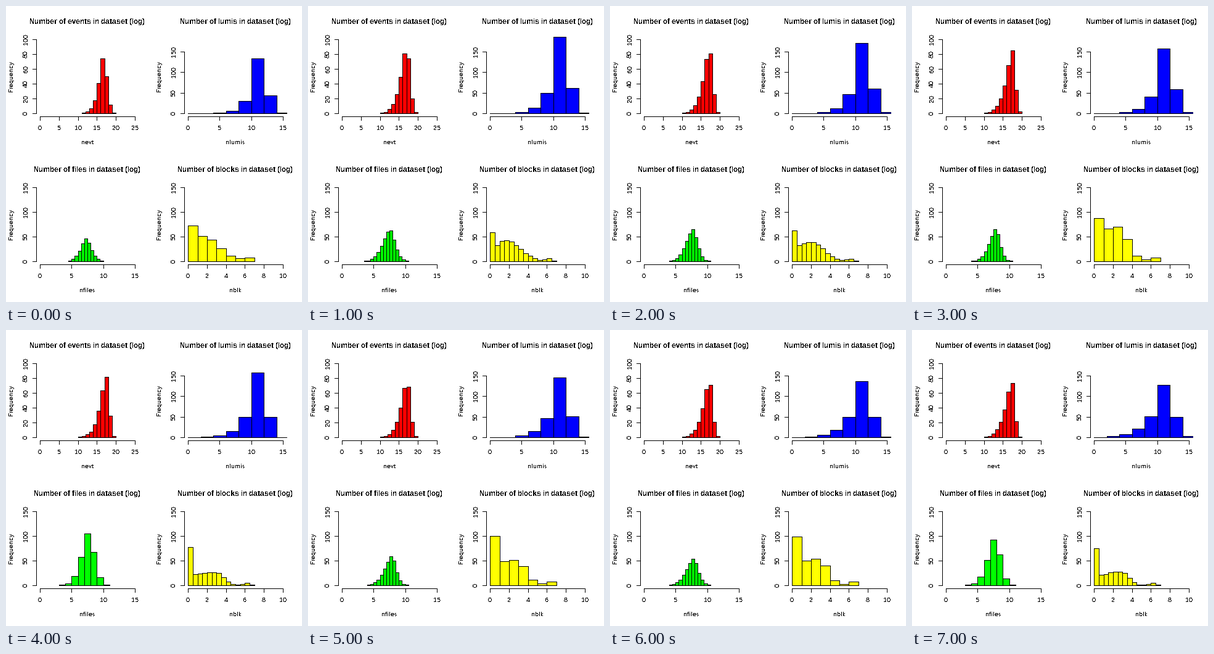
Animation of 480x480 px, one loop 8000 ms. Source, as a matplotlib script:

```python
import math

import matplotlib.pyplot as plt
import numpy as np
from matplotlib.animation import FuncAnimation
from matplotlib.patches import Rectangle

SIZE, DPI, SECONDS = 480, 96, 8
PX = 72 / DPI            # one pixel in points
LEFT, RIGHT, TOP, BOTTOM = 49, 214.9, 49, 179.1   # plot region inside a panel
KEY_TIMES = [0, 1, 3, 4, 5, 7]                    # seconds of the key points

plt.rcParams.update({
    "font.family": "Liberation Sans",
    "text.antialiased": False,
    "text.hinting": "native",
    "text.hinting_factor": 1,
})

fig = plt.figure(figsize=(SIZE / DPI, SIZE / DPI), dpi=DPI, facecolor="white")
ax = fig.add_axes([0, 0, 1, 1])
ax.set(xlim=(0, SIZE), ylim=(SIZE, 0))
ax.axis("off")


def line(x0, y0, x1, y1):
    ax.plot([x0, x1], [y0, y1], color="black", lw=PX, antialiased=False,
            solid_capstyle="projecting")


def label(x, y, text, size=10, **kw):
    ax.text(x, y, text, fontsize=size * PX, ha="center", va="baseline",
            rotation_mode="anchor", **kw)


class Sample:
    """A one-peaked distribution whose parameters drift through key points."""

    def __init__(self, mode, peak, left, right, powers, width=(1,) * 6,
                 spike=(0,) * 6, tail=0, from_zero=False):
        self.keys = [mode, peak, left, right, spike]
        self.powers, self.width = powers, width
        self.tail, self.from_zero = tail, from_zero

    def bins(self, t, xmax):
        """First break, bin width and counts at second t."""
        mode, peak, left, right, spike = (np.interp(t, KEY_TIMES, k)
                                          for k in self.keys)
        width = self.width[np.searchsorted(KEY_TIMES, t, "right") - 1]
        breaks = np.arange(0, xmax + 1, width)
        d = breaks + width / 2 - mode
        fall = np.where(d < 0, (np.abs(d) / left) ** self.powers[0],
                        (np.abs(d) / right) ** self.powers[1])
        bump = self.tail * np.exp(-((d + mode - 6.2) / 0.6) ** 2)
        counts = width * (peak * np.exp(-fall) + bump)
        counts[0] += spike
        counts = np.rint(counts)
        used = np.flatnonzero(counts)
        first = 0 if self.from_zero else used[0]
        return breaks[first], width, counts[first:used[-1] + 1]


class Panel:
    def __init__(self, ox, oy, noun, name, color, xmax, xstep, ymax, ystep, sample):
        self.ox, self.oy = ox, oy
        self.xmax, self.ymax = xmax, ymax
        self.color, self.sample = color, sample
        self.clip = Rectangle((ox + LEFT, oy + TOP), RIGHT - LEFT + 1,
                              BOTTOM - TOP + 1, transform=ax.transData)
        self.bars = []
        mid_x = ox + (LEFT + RIGHT) / 2
        mid_y = oy + (TOP + BOTTOM) / 2
        label(mid_x, oy + 29, f"Number of {noun} in dataset (log)", 12.4,
              weight="bold")
        label(mid_x, oy + 224, name)
        label(ox + 11, mid_y, "Frequency", rotation=90)
        self.draw_axes(range(0, xmax + 1, xstep), range(0, ymax + 1, ystep))

    # Whole pixels: the renderer itself moves thin lines to pixel centres.
    def x(self, v):
        span = RIGHT - LEFT
        return round(self.ox + LEFT + span * (0.04 + v / self.xmax) / 1.08)

    def y(self, v):
        span = BOTTOM - TOP
        return round(self.oy + BOTTOM - span * (0.04 + v / self.ymax) / 1.08)

    def draw_axes(self, xticks, yticks):
        base, side = math.floor(self.oy + BOTTOM), self.ox + LEFT
        line(self.x(xticks[0]), base, self.x(xticks[-1]), base)
        line(side, self.y(yticks[0]), side, self.y(yticks[-1]))
        for t in xticks:
            line(self.x(t), base, self.x(t), base + 6)
            label(self.x(t), self.oy + 201, str(t))
        for t in yticks:
            line(side - 6, self.y(t), side, self.y(t))
            label(self.ox + 35, self.y(t), str(t), rotation=90)

    def show(self, t):
        for bar in self.bars:
            bar.remove()
        self.bars = []
        start, width, counts = self.sample.bins(t, self.xmax)
        for k, n in enumerate(counts):
            x0 = self.x(start + k * width)
            x1 = self.x(start + (k + 1) * width)
            y0, y1 = self.y(0), self.y(n)
            bar = Rectangle((x0, y1), x1 - x0, y0 - y1, facecolor=self.color,
                            edgecolor="black", lw=PX, antialiased=False, zorder=3)
            ax.add_patch(bar)
            bar.set_clip_path(self.clip)
            self.bars.append(bar)


events = Sample(mode=[16.6, 16.9, 17.3, 17.3, 17.0, 17.2],
                peak=[76, 92, 87, 85, 79, 78],
                left=[1.6, 2.0, 2.1, 2.0, 2.0, 2.2],
                right=[1.4, 1.3, 1.2, 1.15, 1.3, 1.15],
                powers=(1.3, 2))
lumis = Sample(mode=[11] * 6,
               peak=[66.5, 92.5, 78.5, 79, 72.5, 63.5],
               left=[1.35, 1.53, 1.5, 1.75, 1.75, 2.2],
               right=[1.9, 1.9, 2.0, 1.85, 1.95, 2.05],
               powers=(1, 2), width=[2] * 6, from_zero=True)
files = Sample(mode=[7.3, 7.6, 7.9, 7.7, 7.9, 7.8],
               peak=[92, 128, 132, 108, 120, 97],
               left=[1.25, 1.65, 1.5, 1.6, 1.6, 1.7],
               right=[1.2, 1.15, 0.95, 1.25, 0.95, 1.15],
               powers=(1.7, 1.7), width=[0.5, 0.5, 0.5, 1, 0.5, 1])
blocks = Sample(mode=[1.5, 1.5, 2.5, 2.9, 2.7, 2.8],
                peak=[52, 88, 70, 54, 52, 57],
                left=[5, 1.6, 5, 6, 6, 4],
                right=[2.4, 2.3, 1.5, 1.25, 1.5, 1.2],
                powers=(1.7, 2), width=[1, 0.5, 1, 0.5, 1, 0.5],
                spike=[24, 36, 31, 57, 57, 57], tail=10, from_zero=True)

panels = [
    Panel(0, 0, "events", "nevt", "#ff0000", 25, 5, 100, 20, events),
    Panel(240, 0, "lumis", "nlumis", "#0000ff", 15, 5, 180, 50, lumis),
    Panel(0, 240, "files", "nfiles", "#00ff00", 15, 5, 150, 50, files),
    Panel(240, 240, "blocks", "nblk", "#ffff00", 10, 2, 150, 50, blocks),
]


def update(t):
    for panel in panels:
        panel.show(t)
    return []


anim = FuncAnimation(fig, update, frames=SECONDS, interval=1000,
                     init_func=lambda: update(0), repeat=True, repeat_delay=0)
plt.show()
```
